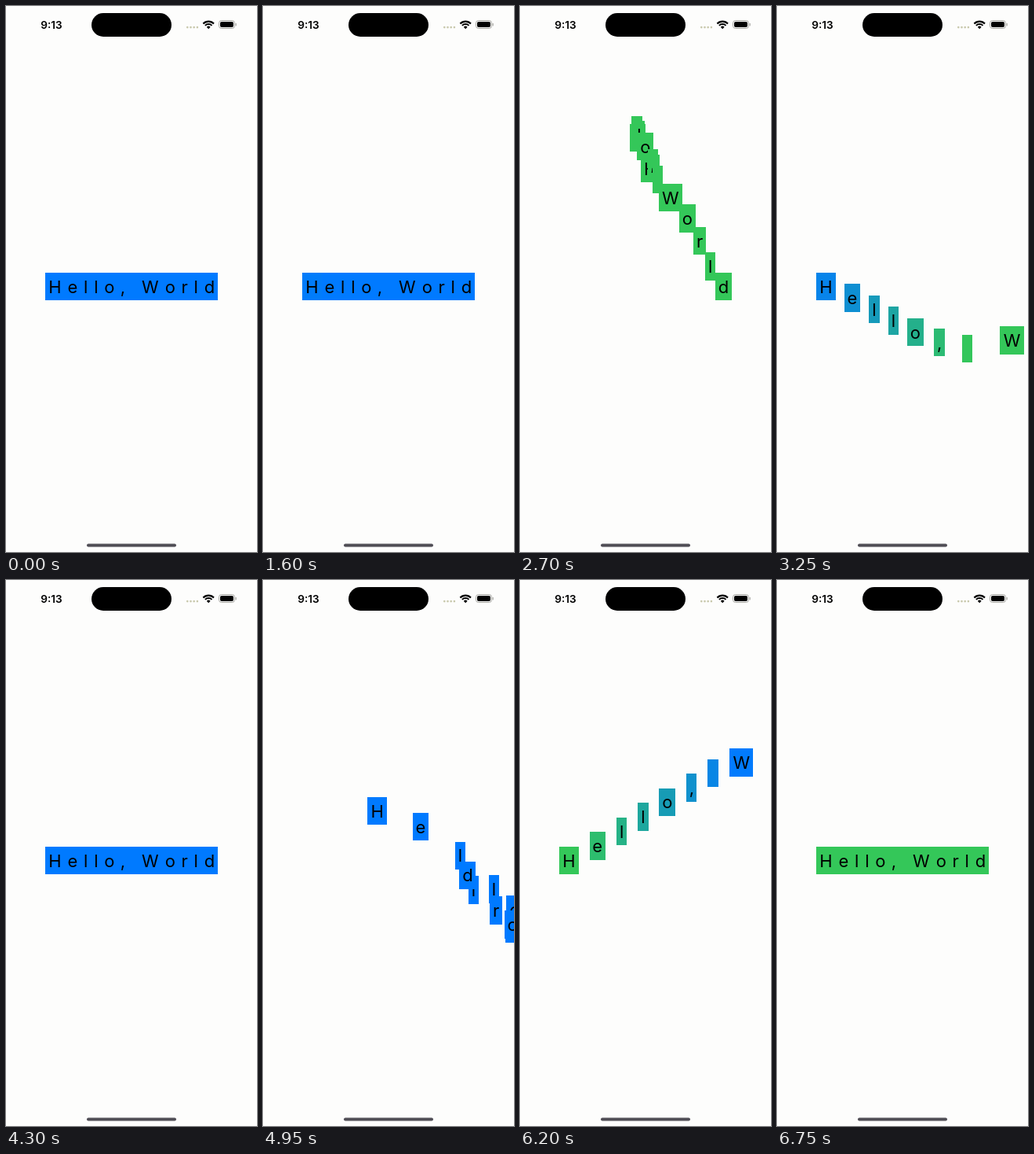
Animation, 320 px wide and 694 px high, one loop 6.8 s. Source, as an HTML page with a canvas:

```html
<!DOCTYPE html>
<html lang="en">
<head>
<meta charset="utf-8">
<title>Trailing letters</title>
<style>
  html, body { margin: 0; width: 100%; height: 100%; overflow: hidden; background: #fdfdfc; }
  canvas { display: block; width: 320px; height: 694px; }
</style>
</head>
<body>
<canvas id="stage"></canvas>
<script>
const W = 320, H = 694, LOOP = 6800, STEP = 50;
const canvas = document.getElementById('stage');
const ctx = canvas.getContext('2d');
const scale = window.devicePixelRatio || 1;
canvas.width = W * scale;
canvas.height = H * scale;

const BACK = '#fdfdfc', BLUE = [0, 122, 255], GREEN = [52, 199, 89];
const BOX_TOP = 338.7, BOX_HEIGHT = 35.7, BASELINE = 25.9;

// Letter boxes sit side by side; each one trails the previous by one step.
const widths = { H: 24.6, e: 20.4, l: 13.3, o: 20.7, ',': 13.3, ' ': 13.2, W: 30.2, r: 15.9, d: 21 };
let nextLeft = 50;
const letters = [...'Hello, World'].map(char => {
  const left = nextLeft;
  nextLeft += widths[char];
  return { char, left, right: nextLeft };
});

// Each drag is a smooth curve through evenly timed points, then a straight glide home.
const drags = [
  { start: 2150, gap: 100, home: 3250, points: [
    [0, 0], [1.5, -58], [8, -113], [20.5, -157], [37, -193],
    [65, -189], [140, -95], [146, 38], [80, 79], [44.5, 58]] },
  { start: 4300, gap: 120, home: 6200, points: [
    [0, 0], [8, 25], [102, 79], [168, 83], [186, 49], [116, -43], [43, -73],
    [19, -42], [14, 12], [56, 42], [127.5, 34], [190, -38], [164, -100], [95, -126]] }
];

// The colour flips at each release and fades linearly.
const releases = [1590, 2945, 5845], FADE = 350;

const clamp = v => Math.min(1, Math.max(0, v));

function spline(a, b, c, d, u) {
  return b + u / 2 * (c - a + u * (2 * a - 5 * b + 4 * c - d + u * (3 * (b - c) + d - a)));
}

function curveAt(points, pos) {
  const last = points.length - 1;
  const i = Math.min(Math.floor(pos), last - 1);
  const at = k => points[Math.min(last, Math.max(0, k))];
  return [0, 1].map(axis =>
    spline(at(i - 1)[axis], at(i)[axis], at(i + 1)[axis], at(i + 2)[axis], pos - i));
}

function offsetAt(t) {
  const drag = drags.find(d => t >= d.start && t < d.home);
  if (!drag) return [0, 0];
  const { start, gap, home, points } = drag;
  const last = points.length - 1, letGo = start + gap * last;
  if (t < letGo) return curveAt(points, (t - start) / gap);
  return points[last].map(v => v * (home - t) / (home - letGo));
}

function colourAt(t) {
  const mix = releases.reduce((sum, time, i) =>
    sum + (i % 2 ? -1 : 1) * clamp((t - time) / FADE), 0);
  return `rgb(${BLUE.map((b, i) => Math.round(b + (GREEN[i] - b) * mix))})`;
}

function pill(x, y, w, h, r, colour) {
  ctx.fillStyle = colour;
  ctx.beginPath();
  ctx.roundRect(x, y, w, h, r);
  ctx.fill();
}

function arc(x, y, r, width) {
  ctx.lineWidth = width;
  ctx.beginPath();
  ctx.arc(x, y, r, -Math.PI * 0.75, -Math.PI * 0.25);
  ctx.stroke();
}

function drawPhone() {
  ctx.fillStyle = BACK;
  ctx.fillRect(0, 0, W, H);

  ctx.fillStyle = '#000';
  ctx.textAlign = 'center';
  ctx.font = '600 13.6px Inter, sans-serif';
  ctx.fillText('9:13', 58, 28.6);
  pill(109, 9, 102, 30, 15, '#000');

  for (let i = 0; i < 4; i++) pill(230 + i * 4.2, 25.8, 2.6, 2.6, 1.3, '#c8c8ac');

  ctx.strokeStyle = '#000';
  arc(258.2, 29.2, 9.6, 2.1);
  arc(258.2, 29.2, 6.1, 2);
  arc(258.2, 29.2, 1.7, 3.4);

  ctx.strokeStyle = '#a9a9a4';
  ctx.lineWidth = 1;
  ctx.beginPath();
  ctx.roundRect(271.5, 18.5, 20, 10, 3.2);
  ctx.stroke();
  pill(273, 20, 17, 7, 2, '#000');
  pill(292.6, 21.8, 1.2, 3.6, 0.6, '#a9a9a4');

  pill(103, 683.5, 114, 4, 2, '#504e56');
}

function drawLetter({ char, left, right }, index, t) {
  const local = t - index * STEP;
  const [dx, dy] = offsetAt(local);
  const x = Math.round(left + dx), y = Math.round(BOX_TOP + dy);
  ctx.fillStyle = colourAt(local);
  ctx.fillRect(x, y, Math.round(right + dx) - x, Math.round(BOX_TOP + BOX_HEIGHT + dy) - y);
  ctx.fillStyle = '#000';
  ctx.fillText(char, (left + right) / 2 + dx, BOX_TOP + BASELINE + dy);
}

function draw(now) {
  const t = Math.floor((now % LOOP) / STEP) * STEP;
  ctx.setTransform(scale, 0, 0, scale, 0, 0);
  drawPhone();
  ctx.font = '400 22px Inter, sans-serif';
  letters.forEach((letter, i) => drawLetter(letter, i, t));
}

const begin = performance.now();
function tick() {
  draw(performance.now() - begin);
  requestAnimationFrame(tick);
}
tick();
</script>
</body>
</html>
```
